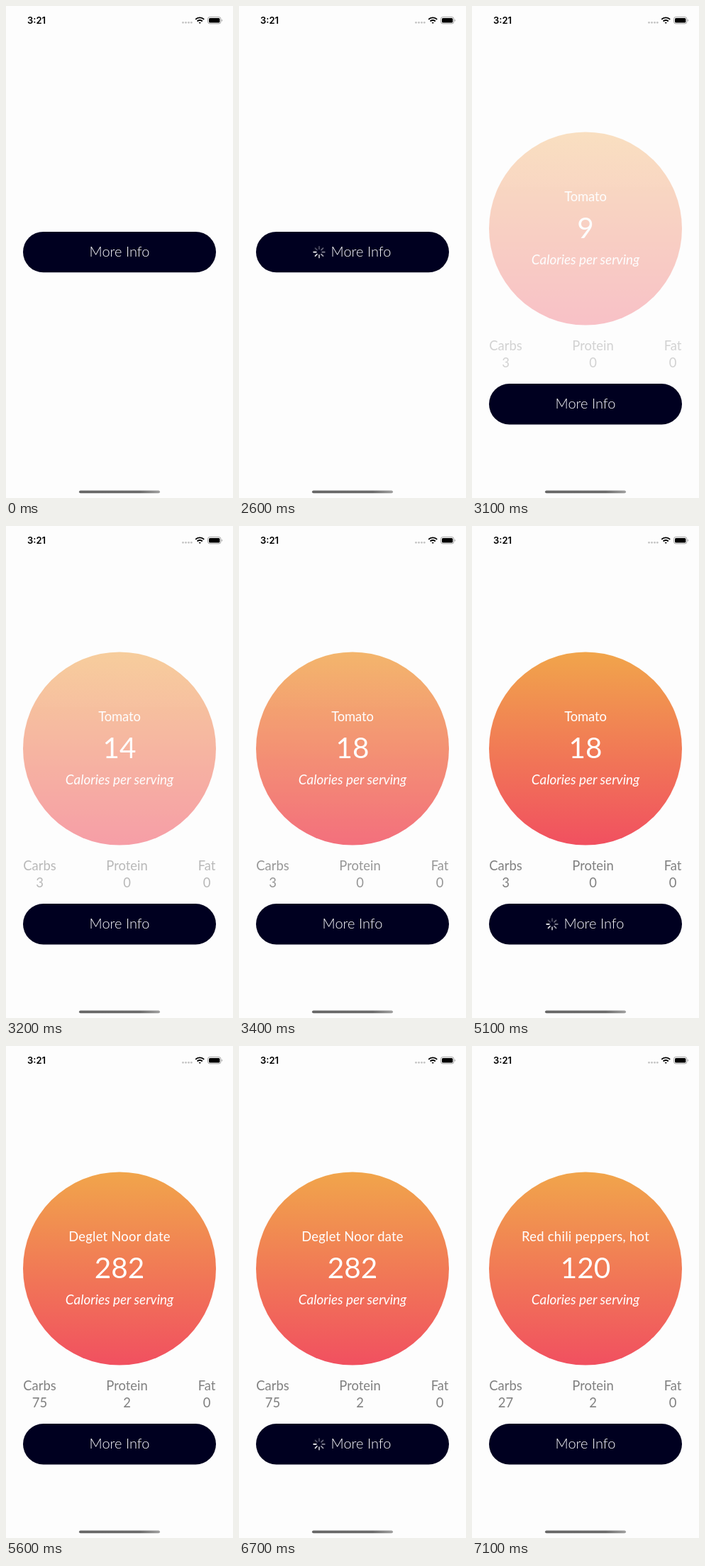
An HTML page for the animation above (7200 ms loop, 320 by 693 pixels).

```html
<!DOCTYPE html>
<html lang="en">
<head>
<meta charset="utf-8">
<title>Nutrition card</title>
<style>
  html, body { margin: 0; width: 100%; height: 100%; overflow: hidden; background: #fdfdfd; }
  svg { display: block; width: 100vw; height: 100vh; }
  text { font-family: Lato, "Open Sans", sans-serif; text-anchor: middle; }
  .clock { font: 600 13px Inter, sans-serif; text-anchor: start; }
  .card text { fill: #fff; font-size: 18.4px; }
  .card .count { font-size: 40.5px; }
  .card .note { font-style: italic; font-size: 18.9px; }
  .card .fact { fill: #808080; font-size: 18.4px; }
  .button text { fill: #fff; font-size: 20px; font-weight: 300; }
</style>
</head>
<body>
<svg viewBox="0 0 320 693">
  <defs>
    <linearGradient id="warm" x2="0" y2="1">
      <stop stop-color="#f1a54b"/>
      <stop offset="1" stop-color="#f15060"/>
    </linearGradient>
    <linearGradient id="bar">
      <stop stop-color="#666"/>
      <stop offset=".75" stop-color="#6a6a6a"/>
      <stop offset="1" stop-color="#a0a0a0"/>
    </linearGradient>
  </defs>

  <g class="status">
    <text class="clock" x="30" y="25">3:21</text>
    <g fill="#c4c4c4">
      <circle cx="249.5" cy="23.3" r="1.4"/><circle cx="253.5" cy="23.3" r="1.4"/>
      <circle cx="257.5" cy="23.3" r="1.4"/><circle cx="261.3" cy="23.3" r="1.4"/>
    </g>
    <g fill="none" stroke="#000" stroke-width="1.9">
      <path d="M267.2 18.9a8.4 8.4 0 0 1 12 0"/>
      <path d="M269.6 21.5a5 5 0 0 1 7.2 0"/>
      <path d="M271.5 22.9h3.4l-1.7 2z" fill="#000" stroke="none"/>
    </g>
    <rect x="284.5" y="15.5" width="18.4" height="9.4" rx="2.8" fill="none" stroke="#a4a4a4"/>
    <rect x="286" y="17" width="15.4" height="6.4" rx="1.5"/>
    <path d="M304 18.7v3q1-.4 1-1.5t-1-1.5" fill="#a4a4a4"/>
  </g>

  <g class="card">
    <circle cx="160" cy="313.5" r="136" fill="url(#warm)"/>
    <text class="title" x="160" y="275"/>
    <text class="count" x="160" y="327"/>
    <text class="note" x="160" y="364">Calories per serving</text>
    <text class="fact" x="47.5" y="484.5">Carbs</text>
    <text class="fact" x="170.5" y="484.5">Protein</text>
    <text class="fact" x="283" y="484.5">Fat</text>
    <text class="fact value" x="47.5" y="509.3"/>
    <text class="fact value" x="170.5" y="509.3"/>
    <text class="fact value" x="283" y="509.3"/>
  </g>

  <g class="button">
    <rect x="24" y="-28.7" width="272" height="57.4" rx="28.7" fill="#000020"/>
    <g class="spinner" transform="translate(113)" stroke="#fff" stroke-width="1.7" stroke-linecap="round"/>
    <text class="label" x="160" y="6.5">More Info</text>
  </g>

  <rect x="103" y="682.4" width="114" height="3.8" rx="1.9" fill="url(#bar)"/>
</svg>
<script>
const LOOP = 7200, STEP = 100, SPOKES = 8;
const FADE = 1000, COUNT = 400;

// Each request: button press, reply, and the food it brings.
const requests = [
  { press: 2600, reply: 2970, title: 'Tomato', spacing: -0.1, kcal: 18, facts: [3, 0, 0] },
  { press: 5100, reply: 5200, title: 'Deglet Noor date', spacing: 0.25, kcal: 282, facts: [75, 2, 0] },
  { press: 6700, reply: 6700 + STEP, title: 'Red chili peppers, hot', spacing: 0.3, kcal: 110, facts: [27, 2, 0] }
];

const $ = s => document.querySelector(s);
const card = $('.card'), title = $('.title'), count = $('.count');
const button = $('.button'), label = $('.label'), spinner = $('.spinner');
const values = document.querySelectorAll('.value');

const spokes = Array.from({ length: SPOKES }, (_, i) => {
  const line = document.createElementNS('http://www.w3.org/2000/svg', 'line');
  line.setAttribute('x1', 4.2);
  line.setAttribute('x2', 7.8);
  line.setAttribute('transform', `rotate(${i * 360 / SPOKES})`);
  return spinner.appendChild(line);
});

const progress = (t, start, span) => Math.min(1, Math.max(0, (t - start) / span));
const easeOut = (u, power) => 1 - (1 - u) ** power;

function drawCard(t) {
  const index = requests.findLastIndex(r => t >= r.reply);
  card.style.display = index < 0 ? 'none' : '';
  button.setAttribute('transform', `translate(0 ${index < 0 ? 346.6 : 560.8})`);
  if (index < 0) return;

  const food = requests[index];
  const from = index ? requests[index - 1].kcal : 0;
  const u = easeOut(progress(t, food.reply, COUNT), 2);
  card.style.opacity = easeOut(progress(t, requests[0].reply, FADE), 3);
  title.textContent = food.title;
  title.style.letterSpacing = food.spacing + 'px';
  count.textContent = Math.floor(from + (food.kcal - from) * u);
  values.forEach((v, i) => v.textContent = food.facts[i]);
}

function drawButton(t) {
  const pending = requests.find(r => t >= r.press && t < r.reply);
  spinner.style.display = pending ? '' : 'none';
  label.setAttribute('x', pending ? 172 : 160);
  if (!pending) return;

  const head = SPOKES / 2 + Math.floor((t - pending.press) / STEP);
  spokes.forEach((s, i) => {
    const lag = (head - i + SPOKES) % SPOKES;
    s.style.opacity = Math.max(0.3, 1 - lag * 0.12);
  });
}

const start = performance.now();
function tick(now) {
  const t = Math.floor(Math.max(0, now - start) % LOOP / STEP) * STEP;
  drawCard(t);
  drawButton(t);
  requestAnimationFrame(tick);
}
tick(start);
</script>
</body>
</html>
```
